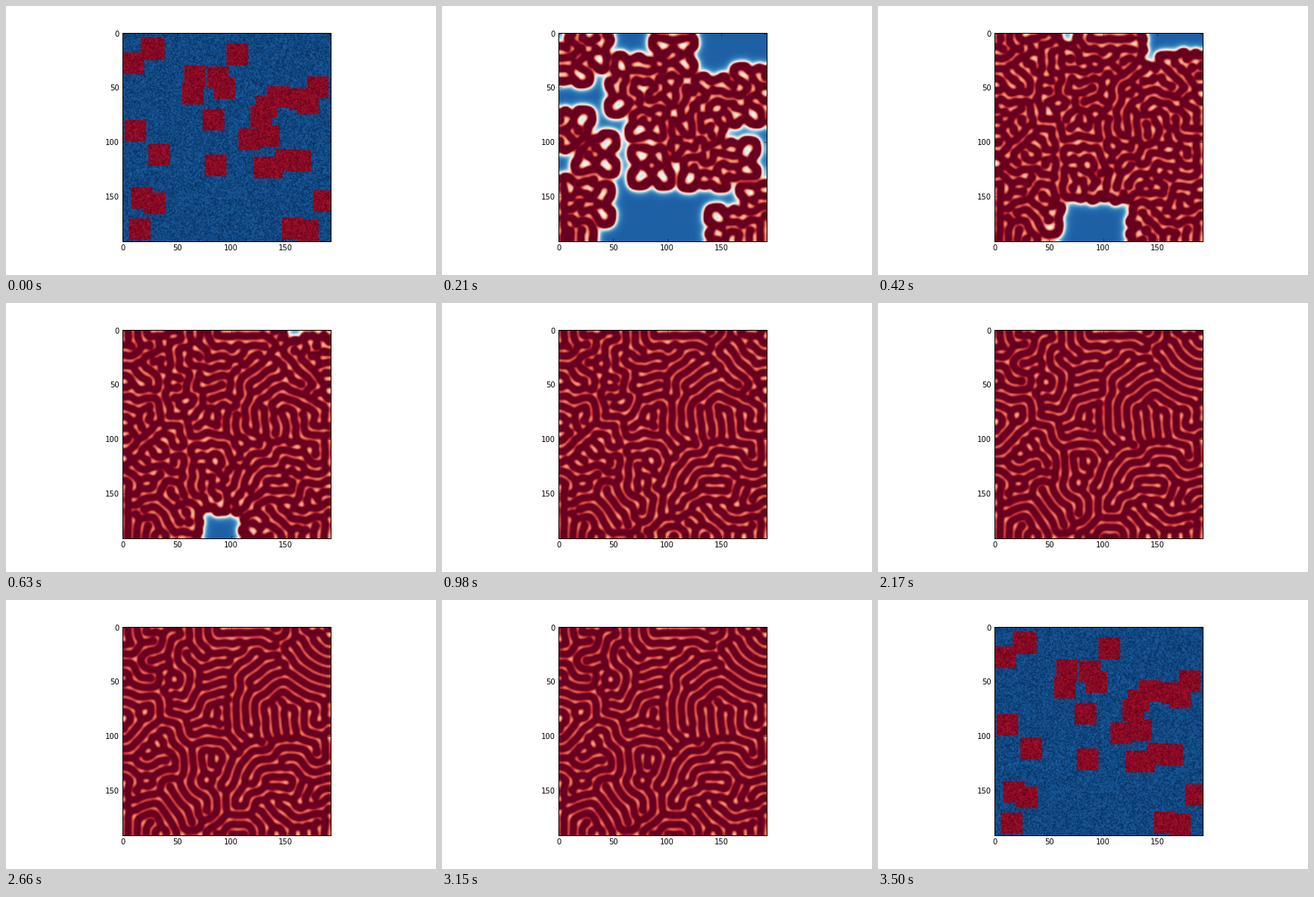
Write a matplotlib script that moves like this. It is 576x360 px and loops after 3570 ms.

```python
import numpy as np
import matplotlib.pyplot as plt
from matplotlib.animation import FuncAnimation

plt.rcParams.update({
    "font.family": "DejaVu Sans", "font.size": 10,
    "axes.linewidth": 1.0, "axes.axisbelow": False,
    "xtick.direction": "in", "ytick.direction": "in",
    "xtick.top": True, "ytick.right": True,
    "xtick.major.size": 4, "ytick.major.size": 4,
    "xtick.major.width": 0.5, "ytick.major.width": 0.5,
    "xtick.major.pad": 4, "ytick.major.pad": 4,
})

# Gray-Scott model, "fingerprint" regime
N = 192
DU, DV, F, K = 0.00019, 0.00005, 0.060, 0.062
DH = 5.0 / (N - 1)
DT = 0.9 * DH**2 / (4 * max(DU, DV))
RATE = (np.array([DU, DV]) * DT / DH**2).astype(np.float32)[:, None, None]

FRAMES = 51
CLOSING = 9       # frame by which the fronts have nearly met
OPEN_CELLS = 530  # cells still untouched at that moment

SIDE = 20
BLOCKS = [  # left, top
    (17, 4), (19, 5), (0, 18), (96, 10), (57, 30), (55, 46), (78, 31),
    (84, 41), (74, 70), (2, 80), (24, 102), (76, 112), (8, 142), (20, 147),
    (6, 171), (176, 145), (147, 170), (161, 172), (170, 40), (134, 49),
    (133, 49), (154, 51), (161, 55), (123, 58), (118, 67), (125, 85),
    (107, 88), (121, 114), (128, 114), (141, 107), (154, 108),
]


def seed_state():
    rng = np.random.RandomState(7)
    w = np.zeros((2, N, N), np.float32)
    w[0] = 1.0
    for x, y in BLOCKS:
        w[0, y:y + SIDE, x:x + SIDE] = 0.50
        w[1, y:y + SIDE, x:x + SIDE] = 0.25
    w += 0.05 * rng.random_sample(w.shape).astype(np.float32)
    return w


def advance(w, steps):
    c = w[:, 1:-1, 1:-1]
    u, v = c
    for _ in range(steps):
        d = w[:, :-2, 1:-1] + w[:, 2:, 1:-1]
        d += w[:, 1:-1, :-2]
        d += w[:, 1:-1, 2:]
        d -= 4 * c
        d *= RATE
        react = u * v
        react *= v
        react *= DT
        d[0] -= react
        d[0] += DT * F * (1 - u)
        d[1] += react
        d[1] -= DT * (F + K) * v
        c += d
        np.maximum(v, 1e-9, out=v)  # avoids slow denormals
        # no flux through the walls
        w[:, 0] = w[:, 1]
        w[:, -1] = w[:, -2]
        w[:, :, 0] = w[:, :, 1]
        w[:, :, -1] = w[:, :, -2]


def steps_per_frame(limit=300):
    w = seed_state()
    for n in range(1, limit):
        advance(w, CLOSING)
        if np.count_nonzero(w[0] > 0.9) < OPEN_CELLS:
            return n
    return limit


def run():
    pace = steps_per_frame()
    w = seed_state()
    states = [w[0].copy()]
    for _ in range(FRAMES - 2):
        advance(w, pace)
        states.append(w[0].copy())
    return states + states[:1]


history = run()

fig = plt.figure(figsize=(8, 5), dpi=72, facecolor="white")
fig.subplots_adjust(left=0.125, right=0.9, bottom=0.125, top=0.9)
ax = fig.add_subplot()
image = ax.imshow(history[0], cmap="RdBu", vmin=0.5, vmax=1.05,
                  interpolation="bilinear", interpolation_stage="rgba")
ax.set_xticks(range(0, N, 50))
ax.set_yticks(range(0, N, 50))


def draw(i):
    image.set_data(history[i])
    return [image]


anim = FuncAnimation(fig, draw, frames=FRAMES, interval=70, repeat=True,
                     repeat_delay=0)
plt.show()
```
